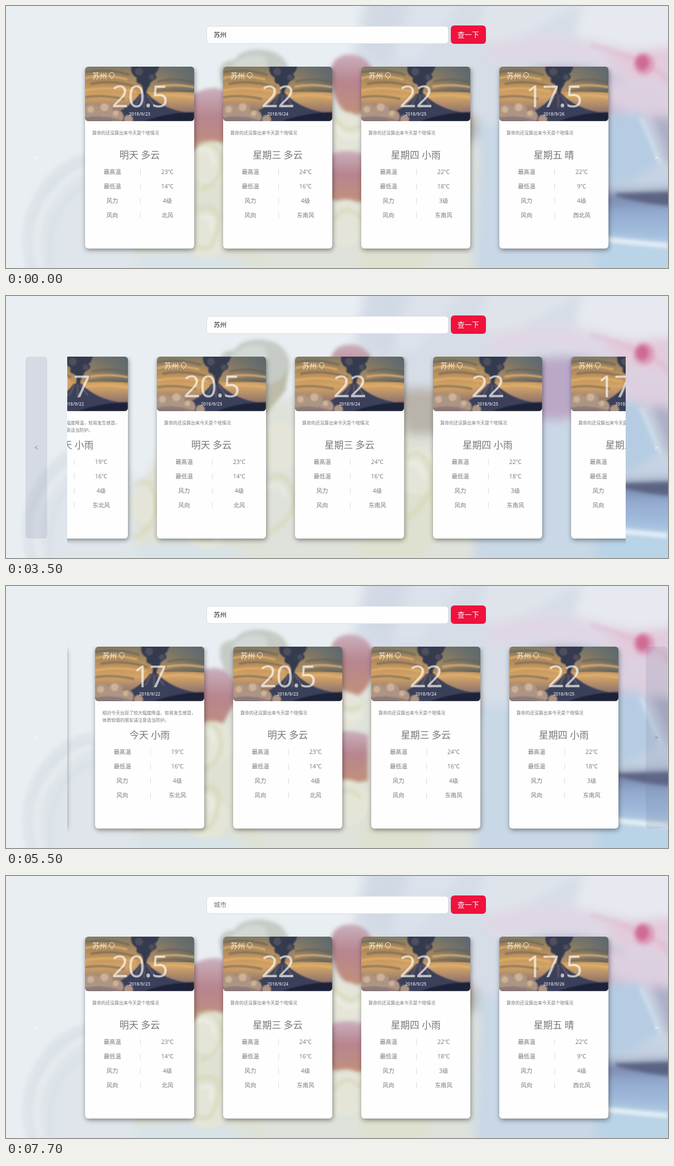
Write an HTML page that moves like this. It is 1189 px wide and 471 px high and loops after 8 s.

```html
<!DOCTYPE html>
<html lang="zh-CN">
<meta charset="utf-8">
<title>天气</title>
<style>
  html, body { margin: 0; width: 100%; height: 100%; overflow: hidden; }
  body { position: relative; background: #e9eef2; color: #787878; white-space: nowrap;
    font-family: "Open Sans", "Noto Sans CJK SC", "Noto Sans CJK", sans-serif; }
  div, svg { position: absolute; }
  .input { left: 360px; top: 36px; width: 433px; height: 30px; border: 1px solid #dcdfe2;
    border-radius: 6px; background: #fefefe; }
  .input div { left: 12px; font-size: 11.5px; line-height: 29px; }
  .input #caret { top: 9px; width: 1px; height: 13px; background: #222; }
  .button { left: 798.5px; top: 35px; width: 63.5px; height: 33px; border-radius: 6px; background: #ef123c;
    color: #fff; font-size: 13px; line-height: 33px; text-align: center; }
  .arrow { top: 109px; width: 39px; height: 327px; line-height: 327px; font-size: 12px; text-align: center; border-radius: 6px; }
  .viewport { left: 110px; top: 109px; width: 1003px; height: 342px; overflow: hidden; }
  .card { width: 196px; height: 327px; border-radius: 6px; background: #fefefe; box-shadow: 1px 3px 9px rgba(0,0,0,.42); }
  .photo { border-radius: 6px; overflow: hidden; }
  .mid { transform: translate(-50%, -50%); line-height: 1; }
  .city { left: 13px; top: 6px; color: rgba(255,255,255,.88); font-size: 13px; line-height: 20px; }
  .temp { left: 98px; top: 52px; color: rgba(255,255,255,.66); font-size: 54px; letter-spacing: -1.5px; }
  .date { left: 98px; top: 85px; color: rgba(255,255,255,.78); font-size: 8px; font-weight: 600; }
  .tip { left: 13px; top: 111.5px; font-size: 8px; line-height: 13px; }
  .day { left: 98px; top: 158px; font-size: 17px; }
  .cell { font-size: 10.4px; }
  .rule { left: 99px; width: 1px; height: 11px; background: #dcdcdc; }
</style>
<body>
<svg id="scene" width="1189" height="471">
  <defs>
    <filter id="soft" x="-30%" y="-30%" width="160%" height="160%"><feGaussianBlur stdDeviation="9"/></filter>
    <filter id="fine" x="-30%" y="-30%" width="160%" height="160%"><feGaussianBlur stdDeviation="3"/></filter>
    <filter id="haze"><feGaussianBlur stdDeviation="1"/></filter>
    <linearGradient id="heart" x2="0" y2="1">
      <stop stop-color="#cbb0bd"/><stop offset=".45" stop-color="#b7858f"/><stop offset="1" stop-color="#c2917a"/>
    </linearGradient>
    <linearGradient id="blue" x2="0" y2="1">
      <stop stop-color="#6c7699"/><stop offset=".4" stop-color="#93abd0"/><stop offset="1" stop-color="#a9c6e2"/>
    </linearGradient>
    <linearGradient id="sky" x2="0" y2="1">
      <stop stop-color="#7f7a66"/><stop offset=".2" stop-color="#a5875f"/><stop offset=".4" stop-color="#c4965e"/>
      <stop offset=".55" stop-color="#d3a467"/><stop offset=".75" stop-color="#a3826b"/><stop offset="1" stop-color="#625766"/>
    </linearGradient>
    <linearGradient id="dusk"><stop offset=".45" stop-color="#56656f" stop-opacity="0"/><stop offset="1" stop-color="#56656f" stop-opacity=".85"/></linearGradient>
    <g id="volcano">
      <rect width="196" height="98" fill="url(#sky)"/>
      <rect width="196" height="46" fill="url(#dusk)"/>
      <g filter="url(#haze)">
        <path d="M0 10Q40 2 80 15M10 31Q50 23 95 37M130 27Q160 19 196 28M125 44Q160 38 196 46M0 55Q30 50 70 58" fill="none" stroke="#665b4e" stroke-width="4" opacity=".55"/>
        <path d="M0 21Q30 12 76 23M0 43Q40 34 92 45M128 36Q160 30 196 37M120 54Q160 47 196 56" fill="none" stroke="#e3b06a" stroke-width="4" opacity=".8"/>
        <path d="M84-4H134Q131 10 125 13 132 19 124 24 117 27 116 34 110 40 110 50H102Q107 38 99 31 90 30 93 20 79 13 84-4Z" fill="#363a50"/>
        <circle cx="97" cy="9" r="7" fill="#50505c"/><circle cx="120" cy="19" r="5" fill="#50505c"/>
        <path d="M40 98L58 82Q86 68 98 49L112 48Q130 69 165 79L196 86V98Z" fill="#3a405a"/>
        <path d="M100 51L90 70M106 50L106 74M111 51L124 70" stroke="#6e6569" stroke-width="3" opacity=".7"/>
        <path d="M105 98Q150 82 196 82V98Z" fill="#1d2138"/>
        <g fill="#ad9585"><circle cx="12" cy="82" r="15"/><circle cx="36" cy="79" r="14"/><circle cx="57" cy="90" r="12"/><circle cx="78" cy="95" r="8"/></g>
        <g fill="#cfb295"><circle cx="35" cy="73" r="7"/><circle cx="10" cy="77" r="6"/><circle cx="55" cy="84" r="5"/></g>
        <path d="M0 98V92Q30 85 72 98Z" fill="#8d7a78"/>
      </g>
    </g>
  </defs>
  <rect width="1189" height="471" fill="#e9eef2"/>
  <g filter="url(#soft)">
    <path d="M645-20H1210V490H700L620 110Z" fill="#d6dde7"/>
    <path d="M640 70L665-20H720L690 110Z" fill="#d0d9e4"/>
    <path d="M735-20H830L740 100H690Z" fill="#dbe2eb"/>
    <path d="M870-20H1060L900 70 840 60Z" fill="#dfe4eb"/>
    <path d="M1040-20H1210V90Q1120 80 1020 60Z" fill="#e6e9ef"/>
    <path d="M860 70Q960 40 1045 60L1130 80 1210 70V150L1120 125Q1000 80 870 110Z" fill="#dfd8e4"/>
    <path d="M1070 85L1210 75V150L1110 130Z" fill="#e2cbdb"/>
    <path d="M940 115Q1040 95 1110 135L1210 170V205L1080 190 1000 225 950 225Z" fill="#bba8c8"/>
    <path d="M1075 130L1210 155V225L1080 180Z" fill="#dccfdf"/>
    <path d="M835 210L1010 225 1090 260V490H820Z" fill="#c9d8e6"/>
    <path d="M1070 195L1140 190 1180 285 1080 335Z" fill="#b5cce2"/>
    <path d="M1155 195L1210 205V300L1188 285Z" fill="#acaec6"/>
    <path d="M1075 330L1176 295 1210 300V328Z" fill="#c3d1e2"/>
    <path d="M1060 335L1210 330V430L1060 415Z" fill="url(#blue)"/>
    <path d="M1060 412L1210 426V490H1060Z" fill="#b9d3e7"/>
    <path d="M225 380Q250 300 330 230L380 200 520 180 650 160 760 190 850 250 840 490H180Z" fill="#dee2da"/>
    <path d="M220 370Q290 270 400 260L470 490H220Z" fill="#dfe1d3"/>
    <path d="M40 400Q70 260 190 270L240 340 230 490H50Z" fill="#dfe5ea"/>
    <path d="M720 250Q780 290 800 380L740 490H630L650 350Z" fill="#dee1cf"/>
    <path d="M700 170Q770 150 848 205 850 245 820 250L720 250Z" fill="#b9b4aa"/>
    <path d="M240 448Q400 425 470 490H220Z" fill="#d8e3e8"/>
  </g>
  <g filter="url(#fine)">
    <path d="M385 130Q378 98 410 97 422 78 455 78 502 80 509 118 508 160 470 210H410Z" fill="#c6cbc6"/>
    <path d="M405 110Q430 80 465 92 480 120 440 145Z" fill="#d3d8d4"/>
    <path d="M467 160Q500 155 510 120L502 170 465 215Z" fill="#bcbca9"/>
    <path d="M582 120Q586 86 620 87 650 89 660 120 665 175 634 196 590 200 582 120Z" fill="url(#heart)"/>
    <path d="M300 200Q325 150 375 147 420 154 410 210L380 265H310Z" fill="url(#heart)"/>
    <path d="M570 275Q600 250 650 268V350Q600 360 570 340Z" fill="url(#heart)"/>
    <g fill="#e4e5d8">
      <circle cx="610" cy="225" r="34"/><circle cx="370" cy="282" r="39"/><circle cx="492" cy="270" r="43"/>
      <circle cx="738" cy="315" r="42"/><circle cx="360" cy="415" r="40"/><circle cx="610" cy="390" r="42"/><circle cx="255" cy="375" r="34"/>
    </g>
    <g fill="none" stroke-width="8" opacity=".4">
      <path d="M340 250Q380 236 386 276T350 330M345 365Q390 350 380 400T345 430M590 200Q610 235 638 214M590 385Q610 350 638 382M470 330Q500 310 515 350T475 425M720 290Q750 270 762 315T720 400M232 340Q260 320 268 365T230 435" stroke="#d2cf9f"/>
      <path d="M340 262Q370 250 374 284M592 215Q610 248 638 230M470 345Q495 330 502 362M724 305Q745 290 750 330M350 380Q375 370 368 405" stroke="#f6f6f0"/>
    </g>
    <path d="M1140 200L1176 284" stroke="#d7e4ef" stroke-width="6" opacity=".7"/>
    <path d="M1075 420L1189 431" stroke="#e6eff6" stroke-width="9"/>
    <path d="M1095 337L1195 334V360Q1150 356 1095 342Z" fill="#4f5575" opacity=".75"/>
    <path d="M1050 70Q1100 82 1145 103T1189 140" fill="none" stroke="#dda5c3" stroke-width="9" opacity=".3"/>
    <ellipse cx="1146" cy="104" rx="19" ry="20" fill="#dc9fbe"/>
    <ellipse cx="1143" cy="102" rx="12" ry="14" fill="#cf6c94"/>
    <g fill="none" opacity=".7">
      <path d="M48 471Q28 405 62 345T151 276" stroke="#d3dce3" stroke-width="24" stroke-dasharray="5 4"/>
      <path d="M63 471Q42 405 76 352T156 290" stroke="#e7ecf0" stroke-width="14"/>
      <path d="M80 471Q72 400 101 360T158 320" stroke="#d8e1e8" stroke-width="10"/>
    </g>
  </g>
</svg>
<div class="input"><div id="query"></div><div id="caret"></div></div>
<div class="button">查一下</div>
<div class="arrow" id="prev" style="left:35px">&lt;</div>
<div class="arrow" id="next" style="left:1149px">&gt;</div>
<div class="viewport"><div id="track"></div></div>
<script>
const $ = id => document.getElementById(id);
const noTip = '算命的还没算出来今天是个啥情况';
const coldTip = '相对今天出现了较大幅度降温，较易发生感冒，<br>体质较弱的朋友请注意适当防护。';
const days = [
  ['昨天 阴', 21, 22, 16, 4, '东风'],
  ['今天 小雨', 17, 19, 16, 4, '东北风'],
  ['明天 多云', 20.5, 23, 14, 4, '北风'],
  ['星期三 多云', 22, 24, 16, 4, '东南风'],
  ['星期四 小雨', 22, 22, 18, 3, '东南风'],
  ['星期五 晴', 17.5, 22, 9, 4, '西北风'],
];

const row = ([label, value], i) => {
  const y = 189 + i * 26;
  return `<div class="cell mid" style="left:49px;top:${y}px">${label}</div>
    <div class="rule" style="top:${y - 5}px"></div>
    <div class="cell mid" style="left:148px;top:${y}px">${value}</div>`;
};

$('track').innerHTML = days.map(([day, temp, high, low, force, wind], i) => `
  <div class="card" style="left:${26 + i * 248}px">
    <svg class="photo" width="196" height="98"><use href="#volcano"/>
      <path d="M48 22C45 18 43.5 17 43.5 15a4.5 4.5 0 0 1 9 0C52.5 17 51 18 48 22Z" fill="none" stroke="#fff" opacity=".85"/></svg>
    <div class="city">苏州</div>
    <div class="temp mid">${temp}</div>
    <div class="date mid">2018/9/${21 + i}</div>
    <div class="tip">${i === 1 ? coldTip : noTip}</div>
    <div class="day mid">${day}</div>
    ${[['最高温', high + '℃'], ['最低温', low + '℃'], ['风力', force + '级'], ['风向', wind]].map(row).join('')}
  </div>`).join('');

const ramp = (t, start, length) => Math.min(1, Math.max(0, (t - start) / length));
const swing = (t, start) => .5 - Math.cos(Math.PI * ramp(t, start, 300)) / 2;
const hover = (t, enter, leave) => ramp(t, enter, 280) - ramp(t, leave, 280);

function paintArrow(arrow, amount) {
  const shade = 255 - 125 * amount;
  arrow.style.background = `rgba(115,120,152,${.16 * amount})`;
  arrow.style.color = `rgb(${shade},${shade},${shade})`;
}

function paintInput(t) {
  const text = t < 7200 ? '苏州' : t < 7300 ? '苏' : '城市';
  const empty = t >= 7300;
  $('query').textContent = text;
  $('query').style.color = !empty ? '#222' : t < 7400 ? '#aaa' : '#757575';
  const caretOn = t >= 6300 && t < 6800 || t >= 7200 && t < 7700;
  $('caret').style.display = caretOn ? 'block' : 'none';
  $('caret').style.left = (empty ? 12 : 10 + 11.5 * text.length) + 'px';
}

function render(t) {
  const scroll = 490 * (1 - swing(t, 3398) + swing(t, 5359));
  $('track').style.left = -Math.round(scroll) + 'px';
  paintArrow($('prev'), hover(t, 2840, 4420));
  paintArrow($('next'), hover(t, 1420, 2330) + hover(t, 4820, 5620));
  paintInput(t);
}

const began = performance.now();
(function loop() {
  render((performance.now() - began) % 8000);
  requestAnimationFrame(loop);
})();
</script>
</body>
</html>
```
